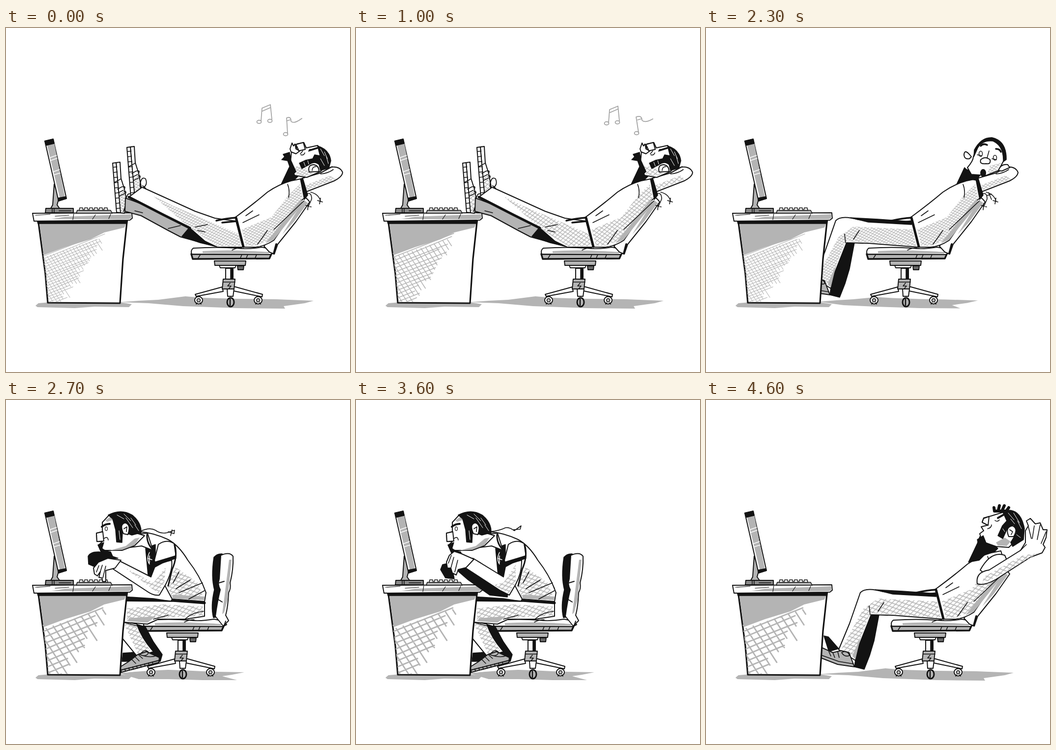
An HTML page that plays this animation: 700 px wide and 700 px high, repeating every 4700 ms.

```html
<!DOCTYPE html>
<html lang="en">
<head>
<meta charset="utf-8">
<title>Office break</title>
<style>
html, body { margin: 0; width: 100%; height: 100%; overflow: hidden; background: #fff; }
svg { display: block; width: 100vw; height: 100vh; }
path, ellipse { stroke-linejoin: round; stroke-linecap: round; }
</style>
</head>
<body>
<script>
const INK = '#131313', GREY = '#b4b4b4', PALE = '#fff', LOOP = 4700;

// Drawing helpers
const path = (d, fill, width, color = INK) =>
  `<path d="${d}" fill="${fill}" stroke="${color}" stroke-width="${width}"/>`;
const shape = (d, fill = PALE) => path(d, fill, 2);
const line = (d, w = 1.6, color) => path(d, 'none', w, color);
const ink = d => path(d, INK, 1.5);
const tone = d => path(d, GREY, 0);
const hatch = d => path(d, 'url(#weave)', 0);
const oval = (x, y, rx, ry, fill = PALE, w = 2, color = INK) =>
  `<ellipse cx="${x}" cy="${y}" rx="${rx}" ry="${ry}" fill="${fill}" stroke="${color}" stroke-width="${w}"/>`;
const shift = (x, y, body) => `<g transform="translate(${x} ${y})">${body}</g>`;
const repeat = (n, make) => Array.from({ length: n }, (_, i) => make(i)).join('');

// Blend two paths of the same structure
function mix(a, b, t) {
  const to = b.match(/-?[\d.]+/g);
  let i = 0;
  return a.replace(/-?[\d.]+/g, v => (+v + (to[i++] - v) * t).toFixed(1));
}

function random(seed) {
  return () => (seed = (seed * 16807) % 2147483647) / 2147483647;
}

// Pen strokes on the front of the desk
function deskStrokes(gap, width, right, seed) {
  const rnd = random(seed);
  let d = '';
  for (let y = 446; y < 556; y += gap) {
    const len = (right - 70) * (1 - (y - 446) / 130) + rnd() * 26 - 10;
    if (len > 4) d += `M${66 + (y - 397) * .12} ${y + 14}l${len} ${-len * (.38 + rnd() * .05)}`;
  }
  for (let x = 24; x < right - 8; x += gap * 1.2) {
    const y = 470 - (x - 66) * .33;
    const len = (right - x - .72 * (y - 430)) / 1.32 + rnd() * 18 - 8;
    if (len > 4) d += `M${x} ${y}l${len * .65} ${len}`;
  }
  return `<g clip-path="url(#front)">${line(d, width, GREY)}</g>`;
}

const shoe = (x, y) => shift(x, y,
  shape('M7 1L15 0L17 33L24 55L29 82L24 104L15 103Z') +
  hatch('M12 62L24 60L28 84L24 102L14 102Z') +
  shape('M0 2L7 1L16 103L8 102Z') +
  line(repeat(9, i => `M${(i + 1) * .8} ${(i + 1) * 10.5}l8 -1`), 1.4) +
  line('M4 41L17 34M10 55l9 -5M12 62l10 -5M14 69l10 -5M20 50q6 -2 5 3M23 60q5 -2 4 3') +
  line('M27 76q3 -16 11 -10q5 12 -5 18q-8 2 -6 -8M29 82l-7 18M32 80q9 4 8 16', 1.8));

// Feet on the desk; t lifts the near leg
function legsUp(t) {
  const near = mix('M277 324L330 348L385 373L425 387L468 393L482 446L430 446L405 434L374 407L320 380L250 344Z',
    'M318 284L360 293L405 303L428 360L465 397L480 446L436 446L412 415L378 344L345 331L309 311Z', t);
  return shoe(217, 273) +
    shape(mix('M243 346L300 367L374 405L425 444L395 436L355 425L330 412L275 382L242 373Z',
      'M245 336L330 362L388 379L430 444L400 438L370 425L335 411L290 390L241 374Z', t), GREY) +
    line('M262 372l16 4M330 408l25 -6M345 380l10 6', 1.3) +
    ink(mix('M358 424L374 405L425 444L395 437Z', 'M392 400L388 381L430 444L400 438Z', t)) +
    shoe(246 + 29 * t, 241 - 34 * t) + shape(near) +
    hatch(mix('M300 342L340 362L430 400L475 420L478 444L430 444L374 407Z',
      'M330 300L372 318L430 380L474 420L477 444L438 444L380 345Z', t)) +
    line(mix('M250 344L320 380L374 407', 'M309 311L345 331L378 344', t), 5 - 2 * t) +
    line(mix('M385 405L410 400M390 412L405 415', 'M380 344L395 338M384 352L408 340', t));
}

const noteStyle = d => line(d, 1.7, '#a0a0a0');
const notes = (x, y, x2, y2, bend) =>
  shift(x, y, noteStyle('M6 33L8 7L25 0L28 30M9 13L25 6') +
    oval(2, 35, 4.5, 3.3, 'none', 1.7, '#a0a0a0') + oval(24, 33, 4.5, 3.3, 'none', 1.7, '#a0a0a0')) +
  shift(x2, y2, noteStyle(`M7 33L${4 + bend} 1Q14 -3 14 8Q20 14 36 ${3 - bend}M5 7L12 5`) +
    oval(3, 34, 4.5, 3.3, 'none', 1.7, '#a0a0a0'));

const forearm = 'M305 334L337 326Q340 345 325 375L312 397Q300 399 285 388L218 344L232 328L295 360Z';
const typingHand = shape('M234 326L207 322L188 330L178 342L180 354L186 358L192 349L189 361L195 362L197 370L203 369L203 347L222 342Z') +
  line('M192 349L196 336M197 362L203 338M184 350L189 337');

const wheel = x => oval(x, 554, 8, 7.5) + oval(x, 554, 3.5, 3.5, GREY, 1.6) +
  line(`M${x - 3} 559L${x - 5} 562M${x + 3} 559L${x + 5} 562`);

const shadows = [
  'M230 558L270 555L310 553L365 546L400 549L470 551L550 552L626 555L608 560L565 566L568 571L470 570L360 566L290 560Z',
  'M230 556L262 553L290 551L330 549L360 550L400 552L430 553L485 554L460 559L440 562L470 570L400 570L330 568L270 568Z'];

// Parts in stacking order; the tag tells which way each one travels
const parts = {
  chair: ['seat',
    shape('M424 474L488 474L487 483L425 483Z', GREY) + shape('M434 483L468 483L466 488L436 488Z') +
    shape('M471 484L484 484L483 492L472 492Z', '#666') +
    shape('M447 489L462 489L462 511L447 511Z') + ink('M457 490L462 490L462 510L457 510Z') +
    shape('M440 527L385 542L387 546L442 536Z') + shape('M464 526L522 542L521 547L463 535Z') +
    shape('M442 511L466 511L464 531L440 531Z', GREY) + line('M442 517L466 517M456 519l-5 6l7 0l-5 6') +
    shape('M450 531L464 531L462 546L451 546Z') + wheel(392) + wheel(513) +
    oval(457, 558, 7, 9, GREY, 3) + line('M456 552L456 564', 2.5) +
    path('M377 460L540 460L536 469L380 470Z', GREY, 3.4) +
    line('M395 462l-4 6M480 461l-3 7M492 461l-3 7M510 461l-3 7') +
    shape('M381 448Q375 453 378 460L538 461L546 457Q540 449 520 446Q490 451 470 448Q430 445 381 448Z') +
    tone('M400 454Q460 450 535 456L535 459L400 458Z') + line('M460 452Q470 447 480 447')],
  backR: ['seat',
    shape('M525 444L600 346Q608 340 618 354L590 394L553 440L546 460L536 456Z') +
    tone('M606 350L614 356L586 394L562 420Z') + line('M550 440L545 459', 4)],
  backS: ['sit',
    ink('M422 443Q416 420 424 386Q417 360 423 320Q430 312 440 313L440 440Z') +
    shape('M437 316Q455 308 462 318Q463 345 456 372Q458 384 453 392Q452 420 447 438L453 449L442 460L426 440Q430 410 436 386Q430 376 434 364Z') +
    tone('M454 325L459 325L451 405L444 432L440 436Z') + line('M434 372l10 -3M430 405l10 6M447 450L442 464', 2)],
  legsS: ['sit',
    ink('M262 455L284 462L300 492L318 518L314 532L236 532L238 515L280 512Z') +
    shape('M236 450L266 456Q276 485 300 512L268 523L236 484Z') +
    hatch('M240 455L264 458Q276 485 294 510L270 520Z') +
    shape('M228 546L250 532L268 518L286 512L312 524L311 534L228 556Z', GREY) +
    line('M228 551L311 530', 2) + line(repeat(9, i => `M${234 + i * 8} ${549 - i * 2}l1 5`)) +
    line('M256 528l8 8M263 523l8 8M270 519l8 7M272 518q12 -14 18 -4q-4 10 -18 4q22 8 34 2') +
    shape('M238 402L335 409L404 413L404 440L365 446L310 446L288 456L238 452Z') +
    hatch('M246 424L320 416L400 420L402 439L312 444L280 452L246 450Z') +
    tone('M250 444L305 440L288 453L248 450Z') + ink('M238 400L300 404L338 410L238 409Z') +
    line('M365 445Q380 432 402 430M300 446L330 438M238 452L275 462')],
  legsDrop: ['lean',
    ink('M240 480L249 482L270 506L250 512Z') +
    ink('M335 437L350 428L370 438L352 437L342 490L333 520L322 548L302 543L308 500Z') +
    shape('M478 397L360 390Q325 380 314 392L292 455L270 508L304 530L311 500L336 437L380 438L482 446Z') +
    hatch('M350 404L470 410L478 444L380 436L334 434L308 500L302 526L276 506L320 425Z') +
    tone('M334 437L316 478L304 528L298 520Z') + ink('M344 386L400 389L470 394L468 400L380 395Z') +
    shape('M236 504L258 514L275 510L291 514L302 543L268 538L232 524Z', GREY) +
    line('M234 519L270 532L300 537M250 512l4 9M258 514l4 10M268 512l3 12M276 514q12 -6 16 6q-10 4 -16 -6') +
    line('M334 437l-2 -18M350 430L362 412')],
  desk: ['',
    path('M66 396L80 500L85 559L232 560L238 470L246 396Z', PALE, 3.2) +
    tone('M68 398L244 399L241 406L200 416L172 430L120 446L77 462Z') +
    `<clipPath id="front"><path d="M67 398L80 500L86 558L231 558L244 399Z"/></clipPath>`],
  strokes0: ['', deskStrokes(5.5, 1.1, 200, 7)],
  strokes1: ['', deskStrokes(7.5, 1.6, 203, 31)],
  strokes2: ['', deskStrokes(12, 2.8, 212, 77)],
  table: ['',
    ink('M63 391L248 391L246 398L65 398Z') + shape('M54 377L256 376L257 387L252 391L57 393Z') +
    tone('M92 389L120 384L255 379L255 387L250 389Z') +
    line('M60 381L90 379M100 383L128 381M138 378l-2 12M182 380l-6 9M213 379l-4 9', 1.2) +
    shape('M81 367L137 367L137 376L80 376Z', '#888') + line('M94 368l0 7M98 368l0 7M108 372l24 0', 1.5) +
    shape('M98 318L95 360L91 367L109 367L104 360L108 345Z', GREY) +
    shape('M79 230L96 226L123 347L107 352Z') + tone('M83 236L98 233L120 345L110 348Z') +
    ink('M79 230L96 226L98 235L81 239Z') + ink('M106 346L122 343L123 347L107 352Z') +
    line('M89 264L103 259M90 270L104 265M95 293L109 288M97 299L110 295', 1.5, PALE) +
    path('M145 371L213 371L216 377L143 377Z', GREY, 1.6) +
    repeat(6, i => path(`M${150 + i * 10} 366l6 0l1 5l-8 0Z`, PALE, 1.5))],
  rest: ['lean', legsUp(0)],
  lift: ['lean', legsUp(.5)],
  kick: ['lean', legsUp(1)],
  torso: ['lean',
    ink('M560 318L576 284L594 302L582 314Z') +
    shape('M467 385Q505 357 532 334Q555 318 580 311L600 307L611 343L600 352L545 432Q525 445 506 446L484 446Z') +
    hatch('M480 410L540 385L575 340L598 318L604 346L545 428L508 443L488 443Z') +
    tone('M600 348L568 388L528 438L545 431L605 356Z') +
    line('M468 386L483 445', 5) + line('M428 392Q450 387 468 386M440 396L470 393', 3.5) +
    line('M545 410L606 352M488 382L502 372M482 396L515 380M575 345Q578 330 573 318M512 440L532 412')],
  armBack: ['lean',
    line('M606 340Q622 330 622 348L615 364M620 334Q636 338 640 352M610 361l11 3M615 357l-1 13M634 351l10 3M640 346l-2 12') +
    shape('M602 306L640 295L662 283Q680 281 685 294Q684 303 668 311L609 334Z') +
    hatch('M610 320L660 300L670 308L612 330Z') + line('M640 297Q655 296 666 288M652 287l12 -5') +
    ink('M599 307L604 306L614 340L607 349Z')],
  fist: ['lean',
    ink('M493 262L518 264L507 313L556 307L576 311L545 335L479 337Z') +
    line('M494 270l20 -4M493 277l20 -3M492 284l18 -3', 1, PALE) +
    shape('M501 224Q503 212 516 212L534 214L537 224L546 220L550 233L541 236L548 247L536 251L530 244L518 256L498 250Z', '#8c8c8c') +
    line('M508 215l2 14M516 213l2 16M525 214l1 15M505 230Q520 238 534 232M512 238L528 242') +
    oval(567, 299, 8, 4, PALE, 1.5) + line('M560 300L550 307')],
  whistle: ['lean',
    shape('M582 240L590 250L592 236L606 233L611 244L634 239L660 268L640 292L612 304L588 300L577 284L580 262Z') +
    hatch('M585 282L605 282L625 296L608 302L590 298Z') +
    ink('M577 253L580 270L590 292L572 312L566 306L578 284L573 270L561 268L567 262L564 257Z') +
    shape('M578 246L582 234L585 240L588 236L590 246L598 250L590 256L580 252Z') +
    shape('M590 237L605 233L609 247L596 250Z') + line('M599 256l5 -6M600 258q6 2 8 -4M616 251q1 -6 6 -3') +
    ink('M634 240Q658 247 661 270L657 285L640 290L637 278Q628 270 617 278L602 286L597 275L610 269L624 266L628 258L639 260Z') +
    line('M640 246l8 14M648 252l6 14M652 262l4 14M640 266l8 14M606 273l3 8M614 270l2 7', 1, PALE) +
    line('M618 249L634 244', 3.5) + shape('M617 293Q613 279 626 278Q637 280 637 292Z') + line('M623 290q0 -8 8 -8')],
  shock: ['lean',
    ink('M580 288L610 296L600 310L580 306Z') +
    shape('M582 284Q594 270 594 262Q606 227 630 224Q657 229 660 262L645 290L620 300L590 298Z') +
    shape('M590 262Q576 244 575 258Q576 268 586 266Z') +
    ink('M596 248Q610 222 632 223Q662 230 661 268L655 272Q656 240 634 230Q612 228 603 244L595 262Z') +
    line('M609 240Q614 234 622 238M640 246Q648 246 650 252', 3.5) +
    oval(609, 256, 3.5, 5.5, PALE, 1.5) + oval(638, 264, 3.5, 5, PALE, 1.5) +
    line('M602 258l9 2M632 266l9 2') + shape('M609 268Q618 260 628 268Q630 278 620 276Q606 278 609 268Z') +
    line('M622 264L626 250') + hatch('M628 280L652 274L640 290L622 298Z') + oval(614, 295, 5, 7, INK) +
    shape('M645 290Q650 276 664 278L668 284L652 291Z') + line('M625 335l6 14M622 341l9 -3')],
  marks: ['',
    line('M609 160Q609 180 613 195M666 153Q658 178 650 205M582 193L594 207M689 206L675 217' +
      'M471 203Q478 188 491 184M488 202Q494 192 505 190M253 195Q254 186 259 183M261 197Q264 186 270 183', 2, '#a0a0a0')],
  dream: ['lean',
    ink('M557 278L552 292L534 330L556 326L576 306L586 296Z') +
    shape('M580 236L565 240L562 248L572 255L560 258L565 266L557 272L562 288L590 298L616 300L632 284L640 240L606 228Z') +
    ink('M552 284L564 276L572 296L560 292L555 296Z') + tone('M590 290L608 280L620 288L612 297L594 296Z') +
    shape('M576 237L565 241L562 249L574 255Z') + line('M573 262q8 -2 8 -8M588 245q5 4 9 -1') +
    ink('M603 226Q640 216 648 262L646 284L624 298L620 290L632 270L626 254L614 260L604 282L594 276L603 256L612 246Z') +
    line('M615 230l12 14M626 230l12 20M634 246l8 16M620 242l8 10M632 274l8 6M604 262l4 6', 1, PALE) +
    line('M594 240L608 232', 4) + shape('M616 278Q608 258 624 256Q636 262 626 278Z') + line('M618 264l6 4l-3 6') +
    line('M587 226l-1 -7M595 224l2 -9M603 224l4 -9M611 226l5 -7M587 226L612 226', 6)],
  reach: ['lean',
    shape('M558 346Q580 306 608 316L613 328L570 356Z') +
    shape('M552 374Q548 350 576 346L640 306L650 290L650 266L656 256L652 246L660 241L670 252L680 250L686 264L694 264L692 280L686 294L690 300L684 311L660 320L604 356Q570 380 552 374Z') +
    hatch('M565 360L645 316L676 312L606 352L562 374Z') +
    line('M668 256L664 282M680 254L674 284M692 268L682 292M656 258L662 282M640 306L652 294')],
  note0: ['', notes(513, 156, 566, 182, 1)],
  note1: ['', notes(508, 159, 568, 180, -2)],
  note2: ['', notes(515, 147, 562, 174, 2)],
  torsoS: ['sit',
    shape('M272 268Q300 270 330 284Q352 296 370 326Q395 358 407 392L404 410L338 405L322 375L308 340L290 305Z') +
    hatch('M345 340L390 372L404 408L338 403L328 378Z') + tone('M340 396L404 400L403 407L338 404Z') +
    ink('M284 302L304 294L304 334L302 366L289 356Z') + line('M338 408L404 413', 5) +
    line('M352 392L400 372M346 384L375 366M372 405L404 388M340 372L352 350') +
    line('M292 310q-7 14 0 24M288 322l9 3M292 317l0 14', 1.5, PALE)],
  headS: ['sit',
    shape('M255 274L288 271L299 306L276 297L252 300Z') +
    shape('M209 235L196 249L196 268L184 271L185 288L196 288L188 296L200 306L236 306L262 296L282 276L262 270L222 236Z') +
    tone('M212 306L244 297L262 282L272 280L262 295L236 305Z') + tone('M202 245L213 237L218 244L206 248Z') +
    ink('M208 234Q235 220 258 235Q276 250 275 270L256 275L248 272L250 256L238 250L236 290L225 289L223 264L217 242Z') +
    line('M226 234l14 8M240 232l14 14M254 240l10 14M262 254l8 12M230 266l2 18M244 240l14 20', 1, PALE) +
    line('M195 258Q202 252 211 252', 4) + oval(204, 262, 2.4, 3.8, PALE, 1.2) +
    shape('M184 271L197 268L199 287L185 288Z') + line('M199 282q8 -6 9 3') +
    ink('M187 295L199 290L195 303L204 307L213 309L217 318L205 320L194 311Z') +
    shape('M239 272Q230 252 243 250Q255 254 248 274Z') + line('M240 262l6 -4l-1 10') +
    line('M287 274Q286 292 300 306', 3)],
  type0: ['sit', ink('M167 318Q172 308 190 309L228 322L196 326L182 340L168 334Z') + shape(forearm) +
    hatch('M240 340L300 372L325 340L322 372L310 394Z') + typingHand +
    line('M272 268Q292 258 304 265Q315 273 328 270L343 265L342 272L330 268M338 264l-3 12')],
  type1: ['sit', ink('M170 322L186 318L202 325L190 340L180 352L169 340Z') + ink('M225 320L300 358L300 366L232 332Z') +
    shape(forearm) + hatch('M240 340L300 372L325 340L322 372L310 394Z') + shift(3, -3, typingHand) +
    line('M272 268Q292 266 304 262Q314 262 326 270L340 264L338 272L328 268M333 262l-2 12')],
  chin: ['sit', ink('M176 335L205 328L250 345L310 385L308 401L272 397L228 366L206 347L198 352L200 364L182 362L172 345Z') +
    shape('M305 334L337 326Q338 350 325 375L312 397L294 388L222 341L238 322L300 360Z') +
    hatch('M300 372L325 335L325 372L310 394L280 376Z') +
    shape('M240 324L215 313L200 308L190 316L184 330L186 342L193 342L196 352L204 356L208 345L224 341Z') +
    line('M193 342L199 320M201 350L207 326M188 332L194 316') +
    line('M272 268Q292 266 304 260Q312 258 322 266L336 256L334 263L320 264')],
  sleeve: ['sit', shape('M302 326L310 294Q326 282 342 292L346 318L304 334Z') +
    ink('M302 330L345 317L346 322L318 332L303 340Z') + line('M343 294Q350 318 338 345L330 378', 3)]
};

const layers = Object.entries(parts).map(([id, [kind, body]]) => `<g id="${id}" class="${kind}"><g>${body}</g></g>`).join('');
document.body.innerHTML = `<svg viewBox="0 0 700 700"><defs>
<pattern id="weave" width="6" height="6" patternUnits="userSpaceOnUse"><path d="M0 1H6M1 0V6" stroke="${GREY}" stroke-width="1.3"/></pattern>
</defs>${tone('M60 565L66 560L90 558L232 558L256 562L250 568L180 567L140 570L64 568Z')}<path id="shadow" fill="${GREY}"/>${layers}</svg>`;

const LEAN = 'backR torso ', SIT = 'backS legsS torsoS headS sleeve ';
const tilt = a => ({ upper: `rotate(${a} 380 430)` });
const raise = { headS: 'translate(0 -5)' };
const elbow = a => ({ chin: `rotate(${a} 310 390)` });

// time, visible parts, chair offset, extra pose
const steps = Array.from({ length: 9 }, (_, i) => {
  const s = [0, 1, 2, 1][i % 4];
  return { at: i * 200, show: `${LEAN}rest armBack whistle note${s}`, x: 0, tex: s };
});
[
  [1800, LEAN + 'lift armBack shock marks', 0],
  [1900, LEAN + 'kick armBack fist shock marks', 0],
  [2100, LEAN + 'legsDrop armBack fist shock', 0],
  [2200, LEAN + 'legsDrop armBack fist shock', -20],
  [2300, LEAN + 'legsDrop armBack shock', -50],
  [2400, SIT + 'type1', -88, tilt(8)],
  [2500, SIT + 'type1', -97, tilt(2)],
  ...Array.from({ length: 8 }, (_, i) => [2600 + i * 100, SIT + (i % 3 === 1 ? 'type0' : 'type1'), -97]),
  [3400, SIT + 'chin', -97, elbow(-8)],
  [3500, SIT + 'chin', -97, elbow(-3)],
  [3600, SIT + 'chin', -97],
  [3700, SIT + 'chin', -97, raise],
  [3900, SIT + 'chin', -97],
  [4100, SIT + 'chin', -97, raise],
  [4300, SIT + 'chin', -97, raise],
  [4500, LEAN + 'legsDrop dream reach', 0, { reach: 'rotate(-35 575 355)' }],
  [4600, LEAN + 'legsDrop dream reach', 0]
].forEach(([at, show, x, pose], i) => steps.push({ at, show, x, pose, tex: [1, 0, 2][i % 3] }));

const el = id => document.getElementById(id);
const upper = ['torsoS', 'headS', 'type0', 'type1', 'chin', 'sleeve'];
const weave = ['rotate(25) skewX(-20) scale(.85)', 'rotate(32) skewX(-15) scale(1.1)', 'rotate(20) skewX(-25) scale(1.3)'];

function draw({ show, x, tex, pose = {} }) {
  const on = new Set(`chair desk table strokes${tex} ${show}`.split(' '));
  for (const [id, [kind]] of Object.entries(parts)) {
    const g = el(id);
    g.style.display = on.has(id) ? '' : 'none';
    g.setAttribute('transform', `translate(${kind ? x + (kind === 'sit' ? 97 : 0) : 0} 0)`);
    g.firstChild.setAttribute('transform', pose[id] || (upper.includes(id) && pose.upper) || '');
  }
  el('shadow').setAttribute('d', mix(...shadows, -x / 97));
  el('weave').setAttribute('patternTransform', weave[tex]);
}

const start = performance.now();
let current;
function tick() {
  const t = (performance.now() - start) % LOOP;
  const step = steps.findLast(s => s.at <= t) || steps[0];
  if (step !== current) draw(current = step);
  requestAnimationFrame(tick);
}
tick();
</script>
</body>
</html>
```
